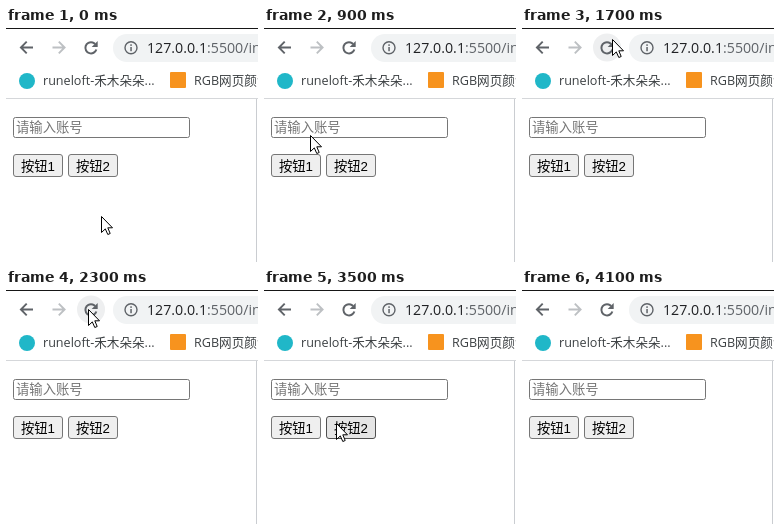
An HTML page with a canvas that plays this animation: 252x234 px, repeating every 4.8 s.

```html
<!DOCTYPE html>
<html lang="zh-CN">
<head>
<meta charset="utf-8">
<title>按钮</title>
<style>
html, body { margin: 0; width: 100%; height: 100%; overflow: hidden; background: #fff; }
canvas { display: block; width: 252px; height: 234px; }
</style>
</head>
<body>
<canvas id="stage" width="252" height="234"></canvas>
<script>
const ctx = document.getElementById('stage').getContext('2d');
const LOOP = 4800;
const UI = '"Open Sans", "Noto Sans CJK SC", "Noto Sans CJK", sans-serif';
const FORM = '"Liberation Sans", "Noto Sans CJK SC", "Noto Sans CJK", sans-serif';
const INK = '#5f6368';

// start time, pointer x, pointer y, hovered item, page loading
const STEPS = [
  [0, 95, 188], [100, 92, 165], [200, 74, 139, 'b2'], [300, 46, 132, 'b1'],
  [700, 46, 131, 'b1', 1], [800, 46, 124, 'b1'], [900, 46, 107],
  [1000, 142, 100], [1100, 90, 112], [1200, 48, 132, 'b1'],
  [1300, 150, 110], [1400, 226, 70], [1500, 170, 40], [1600, 115, 18],
  [1700, 90, 11, 'reload'], [1800, 82, 9, 'reload'], [1900, 82, 8, 'reload', 1],
  [2100, 82, 12, 'reload'], [2200, 82, 16, 'reload'], [2300, 82, 19, 'reload'],
  [2400, 125, 70], [2500, 80, 113], [2600, 48, 134, 'b1'], [2700, 77, 136, 'b1'],
  [2900, 80, 136, 'b2'], [3000, 83, 134, 'b2'], [3100, 84, 134, 'b2', 1],
  [3200, 83, 134, 'b2'], [3300, 76, 134, 'b2'], [3400, 73, 134, 'b2'],
  [3500, 72, 133, 'b2'], [3600, 100, 129, 'b2'], [3700, 126, 125],
  [3800, 98, 128, 'b2'], [3900, 60, 132, 'b1'], [4000, 92, 133, 'b1', 1],
  [4100]
];

function rect(x, y, w, h, color) {
  ctx.fillStyle = color;
  ctx.fillRect(x, y, w, h);
}

function disc(x, y, r, color) {
  ctx.beginPath();
  ctx.arc(x, y, r, 0, Math.PI * 2);
  ctx.fillStyle = color;
  ctx.fill();
}

function box(x, y, w, h, r, fill, line) {
  ctx.beginPath();
  ctx.roundRect(x, y, w, h, r);
  ctx.fillStyle = fill;
  ctx.fill();
  if (!line) return;
  ctx.lineWidth = 1;
  ctx.strokeStyle = line;
  ctx.stroke();
}

function path(d, color, width) {
  ctx.strokeStyle = color;
  ctx.lineWidth = width;
  ctx.stroke(new Path2D(d));
}

function text(str, x, y, size, color, family = UI, align = 'left') {
  ctx.font = `${size}px ${family}`;
  ctx.textAlign = align;
  ctx.fillStyle = color;
  ctx.fillText(str, x, y);
  return x + ctx.measureText(str).width;
}

function reloadIcon(hover, loading) {
  if (hover) disc(85, 19.5, 14, '#eeeff0');
  if (loading) {
    path('M80.5 15 L89.5 24 M89.5 15 L80.5 24', INK, 2);
    return;
  }
  ctx.beginPath();
  ctx.arc(85, 19.8, 5.6, 0.3, Math.PI * 1.76);
  ctx.strokeStyle = INK;
  ctx.lineWidth = 2;
  ctx.stroke();
  ctx.fillStyle = INK;
  ctx.fill(new Path2D('M91.7 13 V19 H85.7 Z'));
}

function toolbar(hover, loading) {
  rect(0, 0, 252, 1, '#161616');
  path('M27 19.5 H15.5 M20.7 13.7 L14.9 19.5 L20.7 25.3', INK, 1.9);
  path('M46.5 19.5 H58 M52.8 13.7 L58.6 19.5 L52.8 25.3', '#bdc0c3', 1.9);
  reloadIcon(hover, loading);

  box(107, 6, 180, 28, 14, '#f1f3f4');
  ctx.beginPath();
  ctx.arc(125, 19.8, 6, 0, Math.PI * 2);
  ctx.strokeStyle = INK;
  ctx.lineWidth = 1.4;
  ctx.stroke();
  rect(124.3, 16.3, 1.5, 1.6, INK);
  rect(124.3, 19, 1.5, 4.2, INK);
  const end = text('127.0.0.1', 141, 25, 14.2, '#202124');
  text(':5500/index', end, 25, 14.2, INK);
}

function bookmarks() {
  disc(21, 53, 8, '#20b7c8');
  text('runeloft-禾木朵朵...', 37, 57, 12.6, '#3c4043');
  box(164, 44, 16, 16, 1, '#f7931e');
  text('RGB网页颜色', 188, 57, 12.6, '#3c4043');
  rect(0, 70, 252, 1, '#d5d7da');
}

function button(x, label, hover) {
  box(x + .5, 126.5, 49, 22, 2.5, hover ? '#e5e5e5' : '#efefef', hover ? '#4f4f4f' : '#767676');
  text(label, x + 25, 143, 13.333, '#000', FORM, 'center');
}

function page(hover) {
  box(7.5, 89.5, 176, 20, 2, '#fff', '#767676');
  text('请输入账号', 10, 104, 13.333, '#757575', FORM);
  button(7, '按钮1', hover === 'b1');
  button(62, '按钮2', hover === 'b2');
  rect(250, 71, 1, 163, '#cacdd1');
}

function pointer(x, y) {
  ctx.save();
  ctx.translate(x, y);
  const shape = new Path2D('M.5 .5 V16.5 L4.3 12.9 L6.8 18.5 L9.2 17.5 L6.8 11.8 H11.5 Z');
  ctx.fillStyle = '#fff';
  ctx.fill(shape);
  ctx.strokeStyle = '#000';
  ctx.lineWidth = 1;
  ctx.stroke(shape);
  ctx.restore();
}

function draw(t) {
  const [, x, y, hover, loading] = STEPS.findLast(step => step[0] <= t);
  rect(0, 0, 252, 234, '#fff');
  toolbar(hover === 'reload', loading);
  bookmarks();
  page(hover);
  if (x !== undefined) pointer(x, y);
}

const start = performance.now();
function tick() {
  draw((performance.now() - start) % LOOP);
  requestAnimationFrame(tick);
}
tick();
</script>
</body>
</html>
```
